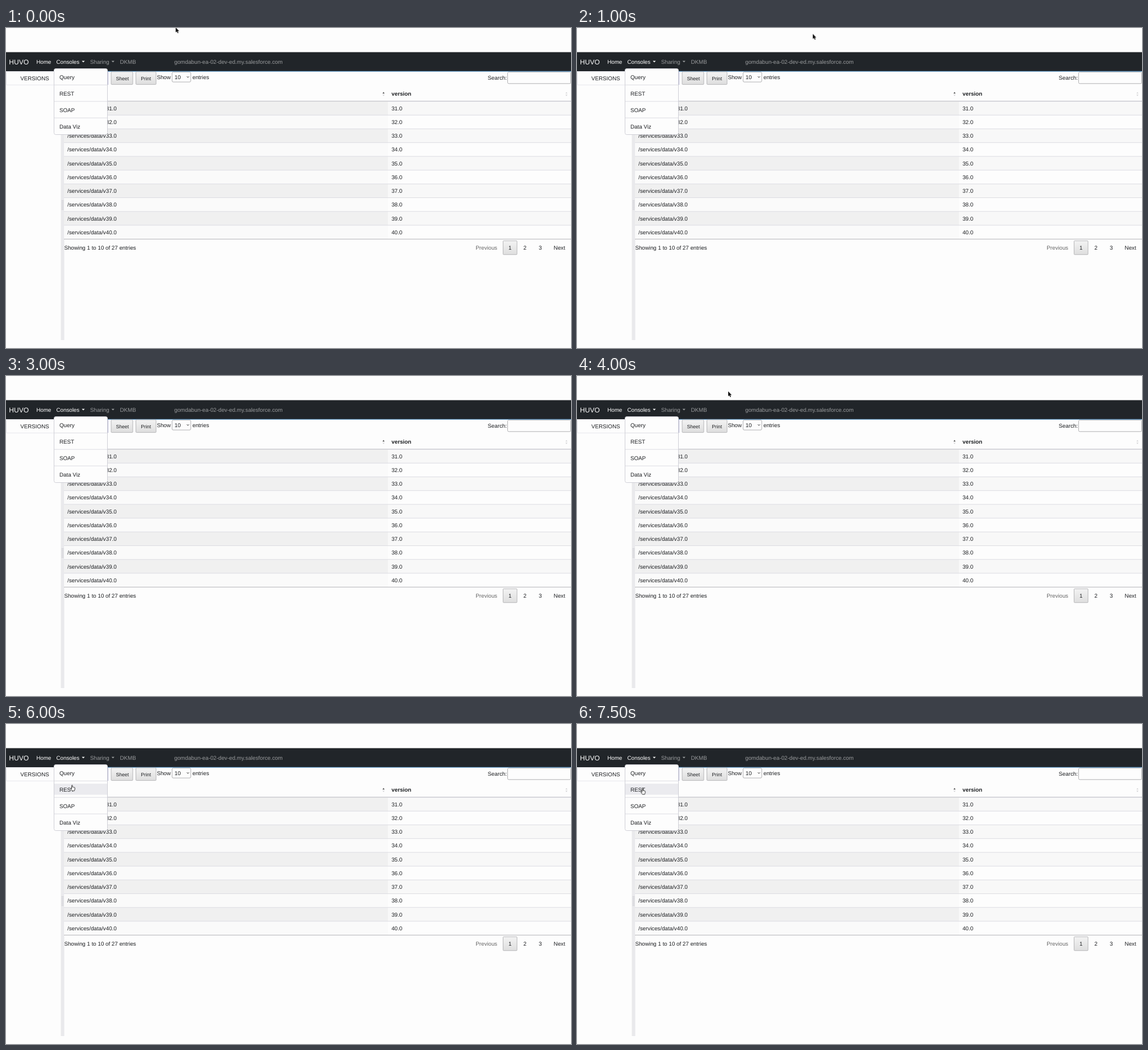
An HTML page that plays this animation: 994x563 px, repeating every 8 s.

```html
<!DOCTYPE html>
<html lang="en">
<head>
<meta charset="utf-8">
<title>Console</title>
<style>
  html, body { margin: 0; width: 100%; height: 100%; overflow: hidden; background: #fdfdfd; }
  svg { display: block; width: 994px; height: 563px; }
  text {
    font: 9.75px "Liberation Sans", Arial, sans-serif;
    fill: #1d1f22;
    text-rendering: geometricPrecision;
    white-space: pre;
  }
  .brand { font-size: 12px; }
  .on { fill: #fff; }
  .off { fill: #999b9d; }
  .bold { font-weight: bold; }
  .small { font-size: 8.7px; }
  .grey { fill: #666; }
  .box { fill: #fdfdfd; stroke: #b0b0b2; }
  .btn { fill: url(#btn); stroke: #b6b6b8; }
  .rule { stroke: #dcdce2; }

  .cursor, .arrow, .hand, .hover { animation: 8s step-end infinite; }
  .cursor { animation-name: move; }
  .arrow { animation-name: arrow; }
  .hand, .hover { animation-name: over; }

  @keyframes move {
    0% { transform: translate(298.5px, -1px); }
    6.25% { transform: translate(458.7px, 2.4px); }
    12.5% { transform: translate(414.8px, 10.4px); }
    25% { transform: translate(395px, -7px); }
    37.5% { transform: translate(340px, -20px); }
    43.75% { transform: translate(286.5px, 13px); }
    50% { transform: translate(266px, 27px); }
    56.25% { transform: translate(196px, 41px); }
    62.5% { transform: translate(149.8px, 50.5px); }
    68.75% { transform: translate(124px, 72.5px); }
    75% { transform: translate(113px, 106.8px); }
    81.25% { transform: translate(112.5px, 113px); }
    87.5% { transform: translate(112px, 116.5px); }
    93.75%, 100% { transform: translate(111.8px, 113px); }
  }
  @keyframes arrow { 0% { opacity: 1; } 75%, 100% { opacity: 0; } }
  @keyframes over { 0% { opacity: 0; } 75%, 100% { opacity: 1; } }
</style>
</head>
<body>
<svg viewBox="0 0 994 563">
  <defs>
    <linearGradient id="btn" x2="0" y2="1">
      <stop stop-color="#f3f3f3"/><stop offset="1" stop-color="#dedede"/>
    </linearGradient>
  </defs>

  <!-- navigation bar -->
  <rect y="42.5" width="994" height="33.5" fill="#212529"/>
  <path d="M102 76.3H994" stroke="#5a9bd0"/>
  <text class="brand on" x="5.3" y="63.6">HUVO</text>
  <text class="on" x="53.5" y="62.8">Home</text>
  <text class="on" x="88.5" y="62.8">Consoles</text>
  <path class="on" d="M133.4 57.8h5.2l-2.6 2.7z"/>
  <text class="off" x="148" y="62.8">Sharing</text>
  <path class="off" d="M185.6 57.8h5.2l-2.6 2.7z"/>
  <text class="off" x="200.5" y="62.8">DKMB</text>
  <text class="off" x="296" y="62.8">gomdabun-ea-02-dev-ed.my.salesforce.com</text>

  <!-- side panel -->
  <rect x=".5" y="76.5" width="96.5" height="23.7" rx="1.5" fill="#fdfdfd" stroke="#e6e6ec"/>
  <text x="25.3" y="91.8">VERSIONS</text>
  <rect x="96.5" y="100" width="6" height="449" fill="#e9e9ec"/>
  <path d="M99.5 303V321" stroke="#cfcfd4" stroke-width="4" stroke-dasharray="1 1"/>

  <!-- toolbar -->
  <path d="M179.5 77V100" stroke="#b9b9d6"/>
  <rect class="btn" x="185" y="77" width="38" height="22.3" rx="1"/>
  <text class="small" x="193.4" y="91.5">Sheet</text>
  <rect class="btn" x="228.5" y="77" width="35.5" height="22.3" rx="1"/>
  <text class="small" x="237.2" y="91.5">Print</text>
  <text x="265.4" y="89.9">Show</text>
  <rect class="box" x="292.2" y="77.5" width="32.8" height="17.5" rx="2"/>
  <text x="296.6" y="89.9">10</text>
  <path d="M318.2 85.2l1.9 1.9 1.9-1.9" fill="none" stroke="#333"/>
  <text x="328" y="89.9">entries</text>
  <text x="847.6" y="91.3">Search:</text>
  <rect class="box" x="882.5" y="77.5" width="111" height="20.3" rx="2"/>

  <!-- table -->
  <path d="M662.4 115.2h3.6l-1.8-2.8z" fill="#444"/>
  <path d="M662.4 117.3h3.6l-1.8 2.8zM984.2 115.2h3.6l-1.8-2.8zM984.2 117.3h3.6l-1.8 2.8z" fill="#d6d6d8"/>
  <text class="bold" x="678.3" y="119.4">version</text>
  <g id="rows"></g>
  <path d="M102 128.6H994" stroke="#c4c4ca"/>
  <path d="M102 371.4H994" stroke="#b4b4b8"/>
  <text x="102.4" y="389.8">Showing 1 to 10 of 27 entries</text>
  <text class="grey" x="826.3" y="390.2">Previous</text>
  <rect class="btn" x="874.5" y="374.3" width="24.5" height="24.4" rx="1"/>
  <text x="884" y="390.2">1</text>
  <text x="910.2" y="390.2">2</text>
  <text x="937.2" y="390.2">3</text>
  <text x="963.6" y="390.2">Next</text>

  <!-- dropdown -->
  <rect x="84.5" y="71.5" width="94" height="116" rx="3" fill="#fdfdfd" stroke="#cfcfd6"/>
  <rect class="hover" x="85" y="105" width="93" height="19.5" fill="#ebebef"/>
  <path class="rule" d="M85 100.2H178M85 129.2H178M85 158.2H178"/>
  <text x="94" y="89.6">Query</text>
  <text x="94" y="118.5">REST</text>
  <text x="94" y="147.5">SOAP</text>
  <text x="94" y="176.5">Data Viz</text>

  <g class="cursor" stroke-linejoin="round">
    <path class="arrow" d="M0 0V8.8L2 7 3.5 10.2 4.9 9.5 3.5 6.4H6.2Z"
          fill="#111" stroke="#fff" stroke-width="1.2" paint-order="stroke"/>
    <path class="hand" d="M2.6 6.2V1.2Q3.3 0 4 1.2V4.2Q4.8 3.5 5.4 4.4 6.2 3.8 6.8 4.8 8.2 4.3 8.2 5.8V8L7.2 10.8H3.4L.6 7.2Q.6 5.6 2.6 7.2Z"
          fill="#fff" stroke="#222" stroke-width=".9"/>
  </g>
</svg>
<script>
  const first = 31, count = 10, top0 = 129, step = 24.22;

  const row = (_, i) => {
    const y = top0 + i * step, base = y + 15.8, v = `${first + i}.0`;
    const [left, right] = i % 2 ? ["#fafafa", "#fdfdfd"] : ["#f0f0f0", "#f8f8f8"];
    return `<rect x="102" y="${y}" width="570" height="${step}" fill="${left}"/>
      <rect x="672" y="${y}" width="322" height="${step}" fill="${right}"/>
      <path class="rule" d="M102 ${y}H994"/>
      <text x="108" y="${base}">/services/data/v${v}</text>
      <text x="678.2" y="${base}">${v}</text>`;
  };

  document.getElementById("rows").innerHTML = Array.from({ length: count }, row).join("");
</script>
</body>
</html>
```
